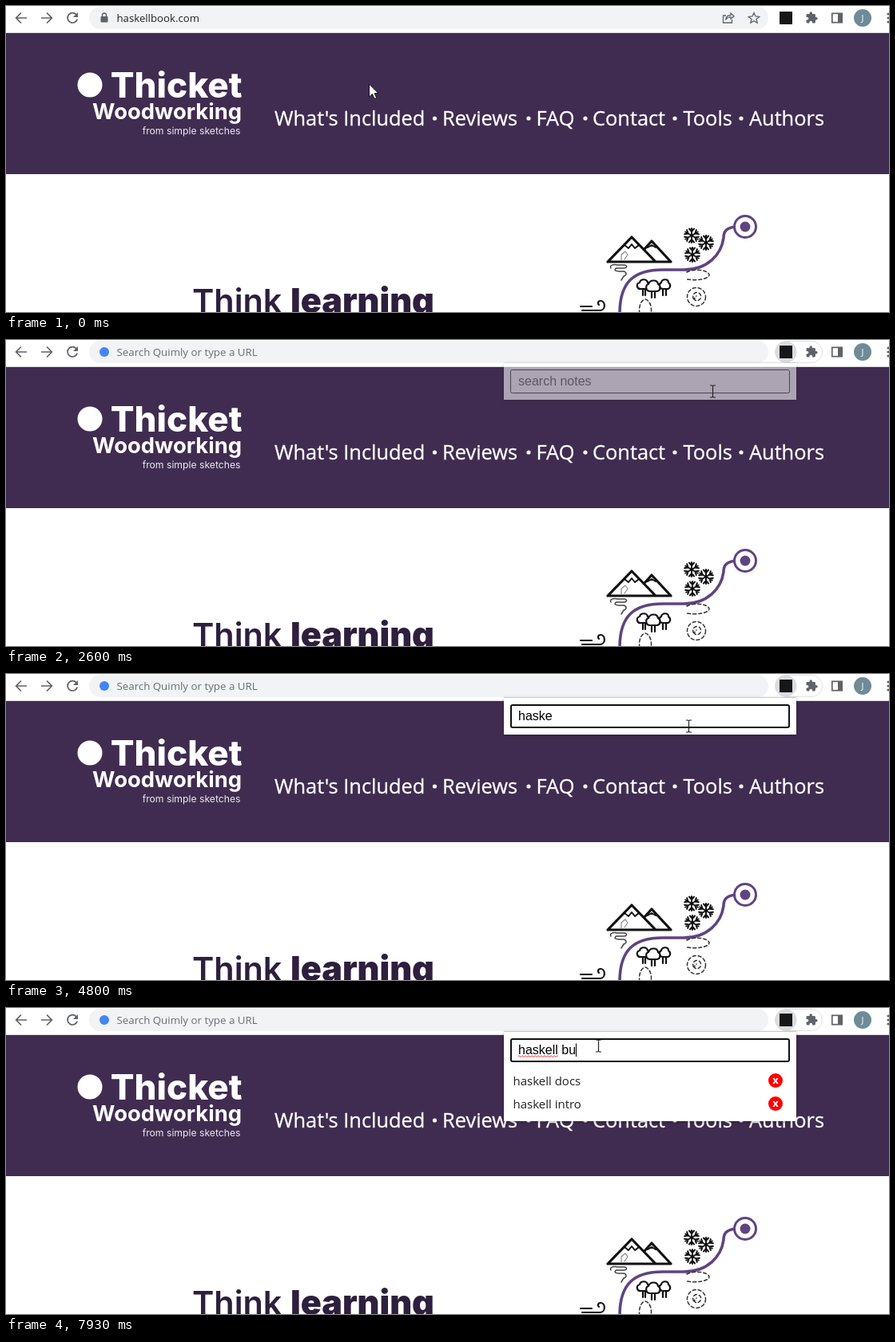
An HTML page that plays this animation: 1105x384 px, repeating every 8 s.

```html
<!DOCTYPE html>
<html lang="en">
<head>
<meta charset="utf-8">
<title>Note search</title>
<style>
  html, body { margin: 0; width: 100%; height: 100%; overflow: hidden; background: #fff; }
  svg { display: block; width: 100vw; height: 100vh; }
  text { white-space: pre; }
  .ui { font-family: "Open Sans", "Noto Sans", sans-serif; }
  .url { font-size: 13.2px; fill: #202124; }
  .nav { font-size: 25.4px; fill: #fff; }
  .nav text { stroke: #fff; stroke-width: .3; }
  .row { font-size: 15px; fill: #222; }
  .brand { font-family: Inter, Roboto, sans-serif; fill: #fff; text-anchor: end; }
  .head { font-family: Inter, Roboto, sans-serif; fill: #2d1f3d; }
  .field { font: 16px "Liberation Sans", Arial, sans-serif; }
  .icon { fill: none; stroke: #5f6368; stroke-width: 1.7; }
  .ink { fill: none; stroke: #111; stroke-width: 2; stroke-linecap: round; stroke-linejoin: round; }
  #panel { filter: drop-shadow(0 1px 2px rgba(0, 0, 0, .3)); }
</style>
</head>
<body>
<svg viewBox="0 0 1105 384" preserveAspectRatio="none">
  <defs>
    <g id="arm" class="ink"><path d="M0 0V-9M-3 -8.5L0 -5L3 -8.5"/></g>
    <g id="flake">
      <use href="#arm"/><use href="#arm" transform="rotate(60)"/><use href="#arm" transform="rotate(120)"/>
      <use href="#arm" transform="rotate(180)"/><use href="#arm" transform="rotate(240)"/><use href="#arm" transform="rotate(300)"/>
    </g>
    <g id="remove">
      <circle r="9" fill="#f00"/>
      <text class="ui" y="4.2" font-size="13" font-weight="700" fill="#fff" text-anchor="middle">x</text>
    </g>
    <pattern id="wave" x="641" y="59" width="4" height="3" patternUnits="userSpaceOnUse">
      <path d="M-1 3L1 .7L3 2.6L5 .3" fill="none" stroke="#f22" stroke-width=".9"/>
    </pattern>
  </defs>

  <!-- page -->
  <rect y="34" width="1105" height="177" fill="#402c50"/>
  <circle cx="105" cy="99" r="15.5" fill="#fff"/>
  <text class="brand" x="295.5" y="115" font-size="44" font-weight="800">Thicket</text>
  <text class="brand" x="295" y="142" font-size="27.4" font-weight="700">Woodworking</text>
  <text class="brand" x="293.5" y="161" font-size="12.2" fill-opacity=".9">from simple sketches</text>
  <g class="ui nav">
    <text x="336" y="150">What's Included</text>
    <text x="546" y="150">Reviews</text>
    <text x="663.5" y="150">FAQ</text>
    <text x="734" y="150">Contact</text>
    <text x="847.5" y="150">Tools</text>
    <text x="930" y="150">Authors</text>
    <circle cx="536.5" cy="141" r="2.6"/><circle cx="654" cy="141" r="2.6"/><circle cx="725" cy="141" r="2.6"/>
    <circle cx="837" cy="141" r="2.6"/><circle cx="920" cy="141" r="2.6"/>
  </g>
  <text class="head" x="233" y="385" font-size="41.4" font-weight="600">Think</text>
  <text class="head" x="356" y="385" font-size="43" font-weight="900">learning</text>

  <!-- trail map -->
  <path d="M912 277C900 279 898 284 898 291C895 312 878 331 848 331H822C786 331 768 346 768 386" fill="none" stroke="#5f4480" stroke-width="3.6"/>
  <circle cx="925" cy="277" r="13.5" fill="#fff" stroke="#5f4480" stroke-width="3"/>
  <circle cx="925" cy="277" r="6.5" fill="#5f4480"/>
  <g class="ink">
    <path style="stroke-width:3.2" d="M753 321L783 290L812 320M799 305L808 295L832 321H753"/>
    <path d="M774 300L779 304L783 299L787 304L792 300M803 303L808 300L813 303"/>
    <path style="stroke-width:1.2;stroke:#888" d="M770 319V312L775 308L778 312L774 318"/>
    <path style="stroke-width:1.5;stroke:#444" d="M757 329C755 325 760 324 765 325H774C778 326 777 329 773 329H764C760 331 763 333 767 333H773C777 334 777 338 773 339L770 344"/>
  </g>
  <use href="#flake" x="858" y="288"/><use href="#flake" x="876" y="297"/><use href="#flake" x="859" y="312"/>
  <g class="ink" style="stroke-width:2.2">
    <path d="M795 355C789 356 788 348 793 347C794 342 802 342 803 347C807 349 806 356 801 355ZM797 356V363M800 356V363"/>
    <path d="M822 355C817 355 816 349 820 347C821 342 829 342 829 347C833 350 831 356 826 355ZM822 356V363M826 356V363"/>
    <path fill="#fff" d="M806 358C800 358 800 350 804 349C806 343 815 343 816 349C820 351 819 358 814 358ZM808 359V366M812 359V366"/>
    <path d="M719 377H733M721 382H744C751 381 750 370 744 370C741 370 740 373 742 375"/>
  </g>
  <g class="ink" style="stroke-width:1.5;stroke:#333" stroke-dasharray="4 3">
    <path d="M852 334C860 329 878 331 880 337C880 343 864 345 852 343"/>
    <circle cx="864" cy="365" r="11.5"/><path d="M861 368A5 5 0 1 1 867 369C863 372 859 367 864 364"/>
    <path d="M793 386C791 376 796 368 800 368C805 369 809 377 807 386"/>
  </g>

  <!-- toolbar -->
  <rect width="1105" height="34" fill="#fff"/>
  <path d="M0 33.5H1105" stroke="#dcdce0"/>
  <g class="icon">
    <path d="M26 15H13M19 8.5L12.6 15L19 21.5M44 15H57M51 8.5L57.4 15L51 21.5"/>
    <path d="M88.3 11.2A6.2 6.2 0 1 0 89.2 16.5"/>
    <path fill="#5f6368" stroke="none" d="M90 8V14H84Z"/>
  </g>
  <rect id="bar" rx="14"/>
  <rect id="marked" x="139" y="6" width="104" height="18" fill="#b5d3f9"/>
  <g id="lock">
    <rect x="118.5" y="13" width="9" height="7.5" rx="1" fill="#5f6368"/>
    <path class="icon" style="stroke-width:1.4" d="M120.5 13V11.5A2.5 2.5 0 0 1 125.5 11.5V13"/>
  </g>
  <text id="address" class="ui url" x="138.5" y="20">haskellbook.com</text>
  <g id="actions" class="icon" style="stroke-width:1.3">
    <path d="M901 12H897.5V21H908.5V17M900.5 17.5C901 13 903.5 11.5 907 11.5V9L911 12.7L907 16V13.8C904 13.8 902 15 900.5 17.5Z"/>
    <path d="M936 8.5L938 13L942.7 13.4L939.1 16.5L940.2 21.2L936 18.7L931.8 21.2L932.9 16.5L929.3 13.4L934 13Z"/>
  </g>
  <circle id="engine" cx="123" cy="15" r="6" fill="#4285f4"/>
  <text id="hint" class="ui" x="138.5" y="20" font-size="13.3" fill="#6a6e73">Search Quimly or type a URL</text>
  <path id="barCaret" d="M139.5 5V22" stroke="#111"/>
  <g id="pill">
    <rect x="962.5" y="1.5" width="59" height="27" rx="13.5" fill="#fff" stroke="#dfe1e5"/>
    <circle cx="976" cy="15" r="13.5" fill="#dadce0"/>
  </g>
  <rect x="968" y="7" width="16" height="16" fill="#17171a"/>
  <path transform="translate(1000.2 6.7) scale(.67)" fill="#5f6368" d="M20.5 11H19V7c0-1.1-.9-2-2-2h-4V3.5a2.5 2.5 0 0 0-5 0V5H4c-1.1 0-2 .9-2 2v3.8h1.5a2.7 2.7 0 0 1 0 5.4H2V20c0 1.1.9 2 2 2h3.8v-1.5a2.7 2.7 0 0 1 5.4 0V22H17c1.1 0 2-.9 2-2v-4h1.5a2.5 2.5 0 0 0 0-5z"/>
  <rect class="icon" x="1033.8" y="9.3" width="12.4" height="11.4"/>
  <rect x="1041" y="9" width="5" height="12" fill="#5f6368"/>
  <circle cx="1072" cy="15" r="11" fill="#6f8b97"/>
  <text class="ui" x="1072" y="19" font-size="11" fill="#fff" text-anchor="middle">J</text>
  <g fill="#5f6368"><circle cx="1104" cy="10" r="1.6"/><circle cx="1104" cy="15" r="1.6"/><circle cx="1104" cy="20" r="1.6"/></g>

  <!-- note search popup -->
  <g id="popup">
    <rect id="panel" x="623" y="30" width="366" height="46" fill="#fff"/>
    <path d="M623 29.5H989" stroke="#c9c9cc"/>
    <rect id="field" fill="#fff" rx="2"/>
    <text id="typed" class="field" x="641" y="58"></text>
    <rect id="squiggle" x="641" y="59" height="3" fill="url(#wave)"/>
    <path id="caret" d="M.5 44.5V61" stroke="#000"/>
    <g id="results">
      <rect id="hover" x="631" y="76" width="350" height="29" fill="#dcdcdc"/>
      <text class="ui row" x="634.5" y="97">haskell docs</text>
      <text class="ui row" x="634.5" y="126">haskell intro</text>
      <use href="#remove" x="963" y="91"/><use href="#remove" x="963" y="120"/>
    </g>
  </g>

  <g id="pointer">
    <path id="arrow" d="M-.5 0V16L3.5 12.6L6 18.4L8.7 17.3L6.2 11.6H11Z" fill="#fff" stroke="#111"/>
    <path id="beam" d="M-3.5 -7.5H-1L0 -6.8L1 -7.5H3.5M0 -7V7M-3.5 7.5H-1L0 6.8L1 7.5H3.5" fill="none" stroke="#222" stroke-width="1.2"/>
    <path id="hand" d="M-1.5 1C-1.5 -1 1.5 -1 1.5 1V7C2 6 4.5 6.2 4.5 8C5 7 7.3 7.2 7.3 9C8 8 9.8 8.5 9.8 10V15C9.8 18 8 19 8 22H-.5C-1 19 -3 17 -5.5 13.5C-6.5 11.5 -4 10.5 -2.8 12L-1.5 13.5ZM4.5 8V12M7.3 9V12M1.5 7V12" fill="#fff" stroke="#111" stroke-linejoin="round"/>
  </g>
</svg>

<script>
const LOOP = 8000, RATE = 15;
const $ = id => document.getElementById(id);
const set = (id, attrs) => { for (const k in attrs) $(id).setAttribute(k, attrs[k]); };
const show = (id, on) => { $(id).style.display = on ? "" : "none"; };
const within = (v, a, b) => v >= a && v < b;

// pointer path: tick, x, y
const path = [
  [0, 455, 98], [1, 444, 92], [3, 380, 60], [5, 318, 30], [6, 318, 30], [7, 300, 20], [9, 272, 16],
  [13, 262, 16], [22, 262, 16], [23, 300, 22], [24, 470, 55], [25, 700, 86], [26, 890, 85],
  [27, 964, 72], [29, 985, 45], [33, 977, 18], [37, 977, 18], [38, 925, 71], [39, 884, 65],
  [43, 854, 66], [81, 854, 66], [83, 838, 68], [86, 780, 74], [89, 739, 79], [95, 738, 79],
  [97, 737, 88], [99, 735, 92], [102, 736, 94], [104, 739, 82], [106, 741, 62], [108, 741, 50],
  [109, 741, 48], [120, 741, 48]
];
const typing = [
  [60, "h"], [61, "ha"], [62, "hask"], [64, "haske"],
  [115, "haskel"], [116, "haskell"], [118, "haskell b"], [119, "haskell bu"]
];
// ticks at which the field caret turns on or off
const blinks = [47, 55, 60, 72, 79, 87, 96, 103, 111];

function pointerAt(n) {
  const i = path.findIndex(p => p[0] > n);
  const [a, ax, ay] = path[i - 1], [b, bx, by] = path[i];
  const k = (n - a) / (b - a);
  return [Math.round(ax + (bx - ax) * k), Math.round(ay + (by - ay) * k)];
}

function drawAddressBar(n) {
  const focused = within(n, 11, 38);
  set("bar", focused
    ? { x: 105, y: 1, width: 849, height: 28, fill: "#fff", stroke: "#1a6fe8", "stroke-width": 2 }
    : { x: 104, y: 1, width: 850, height: 28, fill: "#f1f3f4", stroke: "none" });
  show("marked", within(n, 11, 23));
  show("lock", n < 23);
  show("address", n < 23);
  show("actions", n < 11);
  show("engine", n >= 23);
  show("hint", n >= 38);
  show("barCaret", within(n, 23, 31));
  show("pill", n >= 35);
}

function drawPopup(n, hovering) {
  show("popup", n >= 38);
  if (n < 38) return;
  set("popup", {
    opacity: [.2, .57, .85][n - 38] || 1,
    transform: `translate(0 ${n < 41 ? -1 : 0})`
  });

  const active = n >= 47;
  set("field", active
    ? { x: 632, y: 39, width: 348, height: 28, stroke: "#101010", "stroke-width": 2 }
    : { x: 631.5, y: 38.5, width: 349, height: 29, stroke: "#555", "stroke-width": 1 });

  const last = typing.filter(s => s[0] <= n).pop();
  const label = $("typed");
  label.textContent = last ? last[1] : "search notes";
  label.setAttribute("fill", last ? "#000" : "#757575");

  const width = last ? label.getComputedTextLength() : 0;
  show("squiggle", n >= 80);
  set("squiggle", { width: n < 80 ? 0 : last[1].includes(" ") ? label.getSubStringLength(0, 7) : width });
  show("caret", blinks.filter(b => b <= n).length % 2);
  set("caret", { transform: `translate(${Math.floor(641 + width)} 0)` });

  const found = n >= 91;
  set("panel", { height: found ? 112 : 46 });
  show("results", found);
  show("hover", hovering);
}

function draw(n) {
  const [x, y] = pointerAt(n);
  const hovering = n >= 96 && within(y, 76, 105);
  const inBar = within(x, 104, 955) && y < 30;
  const inField = n >= 38 && within(x, 631, 981) && within(y, 38, 68);
  const kind = hovering ? "hand" : inBar || inField ? "beam" : "arrow";
  drawAddressBar(n);
  drawPopup(n, hovering);
  ["arrow", "beam", "hand"].forEach(id => show(id, id === kind));
  const half = kind === "beam" ? .5 : 0;
  set("pointer", { transform: `translate(${x + half} ${y - half})` });
}

const start = performance.now();
let shown = -1;
function loop() {
  const t = (performance.now() - start) % LOOP;
  const n = Math.floor(t * RATE / 1000 + .06) % (LOOP * RATE / 1000);
  if (n !== shown) draw(shown = n);
  requestAnimationFrame(loop);
}
loop();
</script>
</body>
</html>
```
